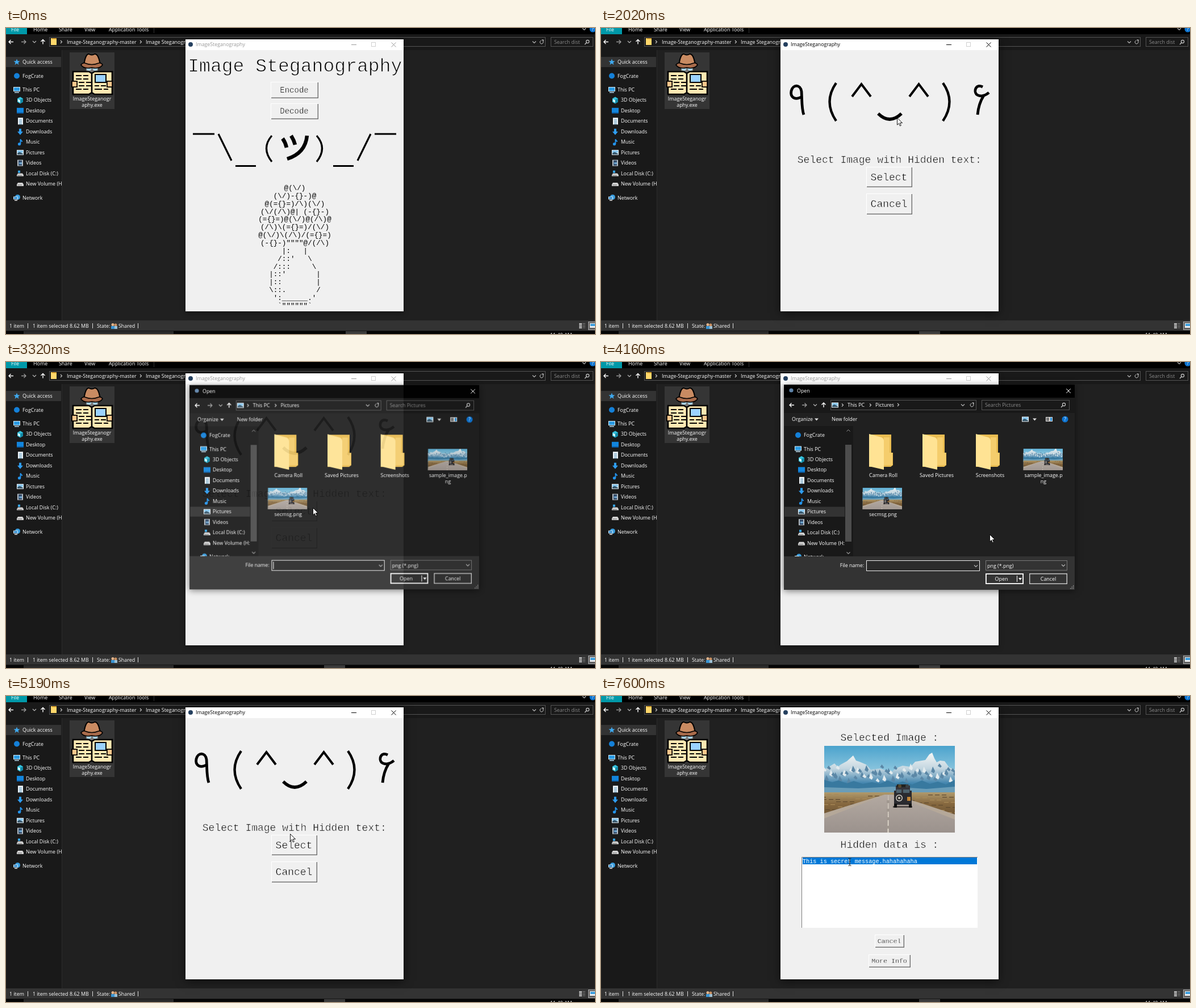
Animation of 1037x540 px, one loop 8 s. Source, as an HTML page with a canvas:

```html
<!DOCTYPE html>
<html lang="en">
<head>
<meta charset="utf-8">
<title>Image Steganography</title>
<style>
html, body { margin: 0; width: 100%; height: 100%; overflow: hidden; background: #000; }
canvas { display: block; width: 1037px; height: 540px; }
</style>
</head>
<body>
<canvas id="stage" width="1037" height="540"></canvas>
<script>
const W = 1037, H = 540, LOOP = 8000, PAPER = '#f0f0f0';
const stage = document.getElementById('stage').getContext('2d');
const layer = Object.assign(document.createElement('canvas'), { width: W, height: H });
let c = stage;

const SANS = '"Open Sans", "Noto Sans", sans-serif';
const MONO = '"Liberation Mono", "DejaVu Sans Mono", monospace';

// ---------- helpers ----------
function rect(x, y, w, h, color) { c.fillStyle = color; c.fillRect(x, y, w, h); }
function frame(x, y, w, h, color, lw = 1) {
  c.strokeStyle = color; c.lineWidth = lw;
  c.strokeRect(x + lw / 2, y + lw / 2, w - lw, h - lw);
}
function fill(d, color) { c.fillStyle = color; c.fill(new Path2D(d)); }
function line(d, color, w = 1) { c.strokeStyle = color; c.lineWidth = w; c.stroke(new Path2D(d)); }
function dot(x, y, r, color) { c.fillStyle = color; c.beginPath(); c.arc(x, y, r, 0, 7); c.fill(); }
function text(s, x, y, color = '#fff', align = 'left', size = 8.9) {
  c.font = `${size}px ${SANS}`; c.fillStyle = color; c.textAlign = align; c.fillText(s, x, y);
}
function mono(s, x, y, size, align = 'center', color = '#000') {
  c.font = `${size}px ${MONO}`; c.fillStyle = color; c.textAlign = align; c.fillText(s, x, y);
}
// large lettering with its stems trimmed to a light weight
function light(s, x, y, size) {
  mono(s, x, y, size);
  c.lineJoin = 'round';
  c.strokeStyle = PAPER; c.lineWidth = size * 0.03; c.strokeText(s, x, y);
  c.lineJoin = 'miter';
}
function at(x, y, draw) { c.save(); c.translate(x, y); draw(); c.restore(); }
function clip(x, y, w, h, draw) {
  c.save(); c.beginPath(); c.rect(x, y, w, h); c.clip(); draw(); c.restore();
}
const chevron = (x, y, col = '#bbb') => line(`M${x - 3} ${y - 1.5}l3 3 3-3`, col, 1.1);
const crumb = (x, y) => line(`M${x - 1} ${y - 2.5}l2.5 2.5-2.5 2.5`, '#ccc', 1.1);
const cross = (x, y, r, col) => line(`M${x - r} ${y - r}l${2 * r} ${2 * r}m0 ${-2 * r}l${-2 * r} ${2 * r}`, col, 1);

// ---------- icons, centred on 0,0 ----------
const icons = {
  star: () => fill('M0-5.5L1.5-1.8 5.5-1.6 2.4.9 3.5 5 0 2.6-3.5 5-2.4.9-5.5-1.6-1.5-1.8Z', '#3fa9ee'),
  disc: () => dot(0, 0, 5, '#1480d8'),
  pc: () => { rect(-6, -5, 12, 8, '#d5eefc'); rect(-5, -4, 10, 6, '#2a9be4'); rect(-4, 4, 8, 1.5, '#b9dcf0'); },
  cube: () => { fill('M0-6L5-3V3L0 6-5 3V-3Z', '#35c1dc'); fill('M0-1L5-3V3L0 6Z', '#118ba8'); fill('M-4-2L0 0V4L-4 2Z', '#d9f8ff'); },
  desk: () => { rect(-6, -5, 12, 9, '#1285dc'); rect(-6, 3, 12, 2, '#0c5fa8'); },
  doc: () => { rect(-4, -6, 9, 12, '#edf3f7'); for (let i = -3; i < 5; i += 2.5) rect(-2, i, 5, 1, '#4f8fb5'); },
  down: () => fill('M-2-5H2V0H5L0 6-5 0H-2Z', '#2f9df0'),
  note: () => { dot(-1.5, 3.5, 2.6, '#2495ee'); line('M.5 3.5V-5Q1-2 4-1', '#2495ee', 1.8); },
  pic: () => { rect(-6, -4.5, 12, 9, '#f1f6f9'); rect(-5, -3.5, 10, 4, '#86c6ee'); fill('M-5 3.5V1L-1-1 5 2V3.5Z', '#35566b'); },
  film: () => { rect(-5, -5.5, 10, 11, '#b5bdc4'); rect(-3, -4.5, 6, 9, '#324a68'); rect(-2, -1, 5, 3, '#6fa6cf'); },
  disk: () => { rect(-4, -5, 4, 4, '#36a6e8'); fill('M-4 0H4L6 3V5H-6V3Z', '#d4d4d4'); rect(-5, 3, 8, 1, '#777'); },
  drive: () => { fill('M-4-2H4L6 1V4H-6V1Z', '#d4d4d4'); rect(-5, 1.5, 8, 1, '#777'); },
  net: () => { dot(1.5, -1, 4.5, '#3b9fe0'); rect(-6, -2, 8, 5, '#d5eefc'); rect(-5, -1, 6, 3, '#2a86cc'); rect(-4, 4, 5, 1.5, '#ddd'); }
};
function icon(kind, x, y) { at(x, y, icons[kind]); }

const rows = [
  ['Quick access', 'star', 60], ['FogCrate', 'disc', 84.5], ['This PC', 'pc', 109],
  ['3D Objects', 'cube'], ['Desktop', 'desk'], ['Documents', 'doc'], ['Downloads', 'down'], ['Music', 'note'],
  ['Pictures', 'pic'], ['Videos', 'film'], ['Local Disk (C:)', 'disk'], ['New Volume (H:)', 'drive'],
  ['Network', 'net', 299.5]
];
function tree() {
  rows.forEach(([label, kind, top], i) => {
    const y = top || 109 + (i - 2) * 18.45;
    icon(kind, top ? 19 : 25, y);
    text(label, top ? 29 : 35, y + 3);
  });
}

function navArrows(x, y) {
  line(`M${x + 9} ${y}h-8m3.5-3.5L${x + 1} ${y}l3.5 3.5`, '#fff', 1.3);
  line(`M${x + 23} ${y}h8m-3.5-3.5l3.5 3.5-3.5 3.5`, '#999', 1.3);
  chevron(x + 46, y);
  line(`M${x + 61} ${y + 4}v-8m-3.5 3.5l3.5-3.5 3.5 3.5`, '#fff', 1.4);
}
function refresh(x, y) {
  c.strokeStyle = '#ccc'; c.lineWidth = 1;
  c.beginPath(); c.arc(x, y, 2.9, -0.6, 4.6); c.stroke();
  fill(`M${x} ${y - 4.5}h3.5v3.5z`, '#ccc');
}
function magnifier(x, y) {
  c.strokeStyle = '#ccc'; c.lineWidth = 1.1;
  c.beginPath(); c.arc(x + 1, y - 1, 2.6, 0, 7); c.stroke();
  line(`M${x - 1} ${y + 1}l-3 3`, '#ccc', 1.3);
}
function help(x, y) { dot(x, y, 5.5, '#0d74d1'); text('?', x, y + 3, '#fff', 'center', 8.5); }

// ---------- file explorer ----------
function spy() {
  fill('M137 66Q140 45 146 46 151 49 156 46 163 45 166 66Z', '#c98b62');
  line('M137 66Q140 45 146 46 151 49 156 46 163 45 166 66', '#000', 2);
  rect(141, 66, 21, 12, '#777');
  dot(146, 71, 4.5, '#a9d3e5'); dot(157, 71, 4.5, '#a9d3e5');
  const brim = 'M132 65Q135 61 139 62 151 67 163 62 168 61 170 65 165 73 151 70 137 73 132 65Z';
  fill(brim, '#a86b4b'); line(brim, '#000', 1.6);
  const paper = 'M118 77H146L151 80 156 77H187V117H156L151 114 146 117H118Z';
  fill(paper, '#ffe9b3'); line(paper + 'M151 80V114', '#000', 2.6);
  for (let i = 0; i < 5; i++) line(`M${i > 1 && i < 4 ? 128 : 123} ${84 + i * 6}h10m3 0h9`, '#000', 2);
  rect(157, 82, 19, 14, '#9bd2ff'); frame(156, 81, 21, 16, '#000', 2);
  line('M156 102h8m3 0h9M156 108h13m3 0h8', '#000', 2);
  for (const x of [116, 178]) { rect(x, 94, 9, 10, '#ffc78c'); frame(x - 1, 93, 11, 12, '#000', 1.8); }
}

function explorer(t) {
  rect(0, 0, W, H, '#202020');
  rect(0, 0, W, 11, '#000');
  rect(0, 0, 37, 11, '#0099a9');
  rect(260, 0, 1, 9, '#333');
  text('File', 9, 6); text('Home', 48, 6); text('Share', 93, 6); text('View', 138, 6);
  text('Application Tools', 181, 6);
  chevron(1018, 2); help(1033, 2);

  rect(0, 11, W, 28, '#191919');
  navArrows(4, 24.5);
  frame(76, 16, 874, 17, '#535353');
  rect(79, 18, 10, 12, '#ffd86b'); rect(81, 18, 8, 2, '#e8ae35');
  crumb(97, 24.5); text('Image-Steganography-master', 107, 27.5);
  crumb(237, 24.5); text('Image Steganography', 246, 27.5);
  chevron(930, 25); refresh(943, 25);
  frame(959, 16, 75, 17, '#535353');
  text('Search dist', 965, 27.5, '#8a8a8a'); magnifier(1023, 25);

  rect(0, 39, 99, 477, '#191919');
  rect(98, 39, 1, 477, '#2b2b2b');
  rect(0, 51, 97, 18, '#333');
  clip(0, 39, 98, 476, tree);

  rect(112, 43, 79, 100, '#353535');
  spy();
  text('ImageSteganogr', 151.5, 127.5, '#fff', 'center');
  text('aphy.exe', 151.5, 139, '#fff', 'center');

  rect(0, 516, W, 18.5, '#333');
  text('1 item', 6, 529); text('1 item selected', 47, 529); text('8.62 MB', 112, 529);
  text('State:', 160, 529); text('Shared', 198, 529);
  for (const x of [38, 152, 232]) rect(x, 521, 1, 9, '#ddd');
  dot(188, 523.5, 2.5, '#e2b48b'); dot(193, 524, 2.5, '#c98f60');
  rect(185, 526, 6, 5, '#3a95d4'); rect(191, 526, 5, 5, '#9cbfd4');
  for (let i = 0; i < 4; i++) { rect(1009, 521 + i * 2.5, 5, 1.5, '#ddd'); rect(1015, 521 + i * 2.5, 5, 1, '#777'); }
  rect(1025, 518, 12, 15, '#606060'); frame(1025, 518, 14, 15, '#aaa');
  rect(1028, 521, 9, 8, '#eee'); rect(1029, 522, 8, 4, '#3c9fdf');

  rect(0, 534.5, W, 6, '#050505');
  rect(31, 535, 264, 5, '#2a2a2a');
  rect(t < 1310 ? 598 : 560, 535, 37, 5, '#3b3b3b');
  text('11:40 AM', 958, 545);
}

// ---------- landscape, 230 x 153 ----------
function fade(y0, y1, ...colors) {
  const g = c.createLinearGradient(0, y0, 0, y1);
  colors.forEach((col, i) => g.addColorStop(i / (colors.length - 1), col));
  return g;
}
function photo() {
  rect(0, 0, 230, 153, fade(0, 60, '#4ba3cd', '#a3d2e4'));
  fill('M0 42L10 36 18 31 24 37 29 33 40 27 51 17 56 26 62 28 74 33 82 42 98 40 118 46 130 38 138 35 152 37 160 28 166 27 178 25 185 15 190 12 194 22 198 29 204 26 212 27 220 38 230 42V90H0Z',
    fade(14, 66, '#f2f4f4', '#c3d6e0', '#4385ae'));
  for (let i = 0; i < 60; i++) {
    const x = i * 3.9, y = 38 + 7 * Math.sin(i * 1.9) + i * 7 % 13, h = 5 + i * 3 % 6;
    fill(`M${x} ${y}l4 ${h} -2 ${h / 2} -5-3z`, i % 3 ? '#5b87a6' : '#e3ebee');
  }
  fill('M0 60L14 64 25 61 40 66 52 62 68 67 84 64 98 67 112 61 126 67 138 63 155 68 172 61 186 67 200 63 214 68 230 60V90H0Z', '#38799f');
  fill('M0 73L60 75 120 72 180 76 230 72V90H0Z', '#6a9db8');
  rect(0, 82, 230, 71, fade(82, 122, '#b09a6c', '#86683f', '#6e5535'));
  for (let i = 0; i < 90; i++) rect(i * 53 % 237 - 7, 85 + i * 17 % 36, 8, 1.2, i % 2 ? '#5f4a30' : '#a98a58');
  fill('M106 86L60 100 0 119V153H230V121L170 101 121 86Z', '#b5a899');
  fill('M108 86L0 128V153H230V130L119 86Z', fade(86, 153, '#b3a9a1', '#9b928d'));
  fill('M112.6 87L111.5 153H113.5L113.2 87Z', '#e3dccf');
  for (let y = 96; y < 150; y += 15) rect(110, y, 5, 5, '#a0978f');
  rect(121, 106, 34, 3, '#4f4846');
  rect(123, 79, 31, 25, '#2a2a2f');
  rect(126, 70, 25, 12, '#35343a');
  rect(128, 68, 20, 5, '#20211f'); dot(133, 71, 3, '#57482f'); dot(146, 71, 3, '#3b4145');
  rect(127, 77, 9, 6, '#4d626d'); rect(139, 77, 11, 6, '#4d626d');
  dot(132, 92, 6, '#dad6cf'); dot(132, 92, 4.6, '#30302f'); dot(132, 92, 2, '#c9c3ba');
  rect(146, 90, 6, 7, '#c08437');
  rect(123, 102, 5, 7, '#111'); rect(149, 102, 5, 7, '#111');
}
function thumb(x, y) {
  clip(x, y, 69.5, 38, () => at(x, y - 4, () => { c.scale(0.303, 0.303); photo(); }));
}

// ---------- application window ----------
function button(label, x, y, w, h, base, size, down) {
  rect(x, y, w, h, down ? '#696969' : '#fff');
  rect(x + 1, y + 1, w - 1, h - 1, down ? '#fff' : '#696969');
  rect(x + 1, y + 1, w - 2, h - 2, down ? PAPER : '#a0a0a0');
  rect(x + 1, y + 1, w - 2.6, h - 2.6, PAPER);
  light(label, x + w / 2 + (down ? 0.5 : -0.5), base + (down ? 1 : 0), size);
}

const pot = String.raw`@(\/)
(\/)-{}-)@
@(={}=)/\)(\/)
(\/(/\)@| (-{}-)
(={}=)@(\/)@(/\)@
(/\)\(={}=)/(\/)
@(\/)\(/\)/(={}=)
(-{}-)""""@/(/\)
|:   |
/::'   \
/:::     \
|::'       |
|::        |
\::.       /
':______.'
` + '`""""""`';

function homePage() {
  light('Image Steganography', 508.8, 77, 33.1);
  button('Encode', 466, 95, 84, 29, 114, 14);
  button('Decode', 466, 133, 84, 28, 151, 14);
  line('M329 187h38M649 187h38M404 243.5h36M576 243.5h36', '#000', 3);
  line('M374 187L397 234M642 187L619 234M468 190Q449 212 468 236M547 190Q566 212 547 236', '#000', 3.2);
  line('M487 195Q492 202 494 211M502 190Q507 198 509 206', '#000', 6.5);
  line('M530 190Q527 221 495 231', '#000', 6.5);
  pot.split('\n').forEach((s, i) => mono(s, 508.5, 286 + i * 13.86, 12.6));
}

function selectPage(t) {
  line('M354 121C340 129 333 121 335 111 338 99 351 99 353 112 354 128 353 142 357 153', '#000', 4.8);
  line('M672 104C660 98 656 111 661 117 667 122 676 120 683 114M674 119C667 130 664 141 663 153', '#000', 4.8);
  line('M414 97Q391 130 414 164M602 97Q625 130 602 164', '#000', 4.3);
  line('M442 121L458.5 99 475 121M543 121L559.5 99 576 121', '#000', 4);
  line('M488 151Q508 171 529 151', '#000', 5.5);
  light('Select Image with Hidden text:', 507.8, 238, 18);
  button('Select', 467, 245, 81, 36, 269, 18, t >= 2670 && t < 2820);
  button('Cancel', 467, 292, 81, 37, 316, 18);
}

function resultPage(t) {
  light('Selected Image :', 508, 79, 18);
  at(393, 88, () => clip(0, 0, 230, 153, photo));
  light('Hidden data is :', 508, 268, 18);
  rect(353, 284, 310, 125, '#fff');
  line('M353.5 409V284.5H663', '#808080');
  const message = 'This is secret message.hahahahaha';
  const put = color => mono(message, 355, 294.5, 10.2, 'left', color);
  put('#000');
  const mark = t >= 7520 ? [355, 307] : t >= 7290 ? [404, 37] : null;
  if (mark) clip(mark[0], 285, mark[1], 12, () => { rect(355, 285, 307, 13, '#0078d7'); put('#fff'); });
  button('Cancel', 482, 421, 52, 23, 436, 11.6);
  button('More Info', 471, 456, 74, 23, 471, 11.6);
}

function appWindow(t) {
  const active = t >= 1310 && t < 2820 || t >= 4950;
  c.save();
  c.shadowColor = active ? 'rgba(0,0,0,.6)' : 'rgba(0,0,0,.4)';
  c.shadowBlur = active ? 16 : 9; c.shadowOffsetY = 3;
  rect(316, 20, 384, 480, PAPER);
  c.restore();
  rect(316, 20, 384, 19, '#fff');
  const ink = active ? '#000' : '#999';
  dot(325, 29, 4, '#25405f');
  text('ImageSteganography', 334, 32, ink, 'left', 8.8);
  rect(608, 29, 9, 1, ink);
  frame(643, 25, 8, 8, '#d0d0d0');
  cross(682.5, 29.5, 4, ink);
  if (t < 1390) homePage(); else if (t < 5360) selectPage(t); else resultPage(t);
}

// ---------- file dialog ----------
function dialogShell(closing) {
  c.save();
  c.shadowColor = 'rgba(0,0,0,.5)'; c.shadowBlur = 11; c.shadowOffsetY = 2;
  rect(322, 40, 512, 362, '#202020');
  c.restore();
  rect(322, 40, 512, 23, closing ? '#1c1c1c' : '#000');
  if (!closing) { dot(335, 50, 3.6, '#5d82a8'); cross(823, 51, 3.8, '#fff'); }
  text('Open', closing ? 329 : 345, 54);
}
function sidePane(x, y) { rect(x - 6, y - 4, 12, 8, '#ddd'); rect(x - 5, y - 3, 5, 6, '#777'); rect(x + 2, y - 3, 3, 6, '#2c90d8'); }

function dialogLoading() {
  dialogShell(false);
  rect(322, 343, 512, 59, '#2e2e2e');
  rect(322, 144, 119, 18, '#3d3d3d'); rect(442, 90, 1, 253, '#2b2b2b');
  icon('star', 347, 129); text('Quick access', 357, 132);
  icon('pc', 347, 153); text('This PC', 357, 156);
  text('Working on it...', 601, 134);
  for (const y of [74, 101]) { sidePane(774, y); help(802, y); }
  rect(422, 353, 41, 12, '#1a1a1a');
  rect(467, 350, 200, 19, '#fff');
  frame(677, 350, 144, 18, '#777'); text('png (*.png)', 680, 362); chevron(814, 359);
  rect(677, 372, 67, 21, '#151515'); rect(754, 372, 67, 21, '#151515');
}

function folder(x, label) {
  fill(`M${x} 128h39v32h3v22l-4 3H${x}z`, '#e9bc51');
  fill(`M${x} 127l22 6q4 2 4 6v51L${x} 184z`, '#ffe394');
  fill(`M${x + 26} 133h10v27h5v22h-15z`, '#f5cd6c');
  text(label, x + 25, 202.5, '#fff', 'center');
}

function dialogReady(t) {
  const closing = t >= 4950, picked = t >= 4780;
  dialogShell(closing);
  rect(322, 63, 512, 27, '#191919');
  navArrows(331, 76);
  frame(404, 67, 257, 18, '#535353');
  icon('pic', 412, 76); crumb(425, 76); text('This PC', 434, 78.5);
  crumb(474, 76); text('Pictures', 483, 78.5);
  if (t >= 3520) crumb(523, 75.5);
  chevron(637, 76); refresh(653, 76);
  frame(670, 67, 155, 18, '#535353');
  text('Search Pictures', 676, 79, '#8a8a8a'); magnifier(814, 76);

  text('Organize', 336, 104); fill('M376 99.5h7l-3.5 4z', '#ddd');
  text('New folder', 406, 104);
  icon('pic', 747, 101); fill('M760 99.5h7l-3.5 4z', '#ddd');
  sidePane(789, 101); help(817, 101);

  rect(322, 113, 107, 230, '#191919');
  rect(323, 255.5, 106, 17.5, '#333');
  clip(322, 113, 107, 230, () => at(328, 44.5, tree));
  rect(429, 113, 15, 230, '#191919');
  rect(430, 146, 11, 171, '#4d4d4d');
  line('M432.500 122.500l3-3 3 3', '#999'); chevron(435.5, 337, '#999');

  folder(472, 'Camera Roll'); folder(566, 'Saved Pictures'); folder(660, 'Screenshots');
  thumb(743.5, 153);
  text('sample_image.p', 779, 202.5, '#fff', 'center');
  text('ng', 779, 214, '#fff', 'center');
  if (t >= 4470) {
    rect(456, 220, 80, 56, picked ? '#777' : '#4d4d4d');
    if (picked) frame(456, 220, 80, 56, '#999');
  }
  thumb(460.5, 222);
  text('secmsg.png', 496.5, 272, '#fff', 'center');

  rect(322, 343, 512, 59, '#333');
  text('File name:', 463, 362, '#fff', 'right');
  rect(467, 350, 200, 19, '#2b2b2b'); frame(467, 350, 200, 19, '#eee'); chevron(660, 360);
  if (picked) text('secmsg.png', 470, 363);
  else if (t < 3770 || t >= 4240) rect(470, 353, 1, 13, '#fff');
  frame(677, 350, 144, 18, '#777'); text('png (*.png)', 680, 362.5); chevron(814, 359);
  frame(677, 373, 67, 19, '#fff', 1.8); text('Open', 705, 385.5, '#fff', 'center');
  rect(732, 377, 1, 11, '#fff'); fill('M735 381h6l-3 4z', '#fff');
  frame(754, 373, 67, 19, '#ccc', 1.4); text('Cancel', 787.5, 385.5, '#fff', 'center');
  for (let i = 0; i < 3; i++) for (let j = 0; j <= i; j++) rect(831 - j * 2.5, 394 + i * 2.5, 1.3, 1.3, '#aaa');
}

// start, opacity, scale
const fades = [
  [3140, 0.33, 0.967], [3220, 0.72, 0.987], [3300, 0.93, 0.996], [3380, 1, 1],
  [4950, 0.92, 0.996], [5030, 0.68, 0.988], [5110, 0.3, 0.972], [5190, 0, 1]
];
function dialog(t) {
  const step = fades.filter(f => t >= f[0]).pop();
  if (!step || !step[1]) return;
  const [, alpha, scale] = step;
  c = layer.getContext('2d');
  c.clearRect(0, 0, W, H);
  if (t < 3300) dialogLoading(); else dialogReady(t);
  c = stage;
  c.save();
  c.globalAlpha = alpha;
  c.translate(578, 221); c.scale(scale, scale); c.translate(-578, -221);
  c.drawImage(layer, 0, 0);
  c.restore();
}

// ---------- pointer ----------
// first step, last step, steps, x, y
const moves = [
  [140, 140, 1, 740, 352], [210, 210, 1, 636, 270], [450, 680, 4, 535, 169], [850, 1080, 4, 516, 150],
  [2020, 2020, 1, 521, 158], [2105, 2270, 3, 540, 246], [2420, 2500, 2, 540, 257],
  [3770, 3990, 4, 684, 304], [4240, 4550, 5, 500, 243], [5900, 6200, 5, 531, 379], [6510, 6990, 7, 438, 293]
];
const clicks = [[1310, 1470], [2670, 2820], [4780, 5110], [7210, 7600]];

function pointer(t) {
  let x, y;
  for (const [t0, t1, n, tx, ty] of moves) {
    if (t < t0) break;
    const k = n > 1 ? Math.min(n, 1 + Math.floor((t - t0) / ((t1 - t0) / (n - 1)) + 1e-6)) : 1;
    const p = k / n, e = p * (2 - p);
    x = k === n ? tx : x + (tx - x) * e;
    y = k === n ? ty : y + (ty - y) * e;
  }
  if (x === undefined) return;
  if (clicks.some(([a, b]) => t >= a && t < b)) dot(x, y + 0.5, 9, 'rgba(250,212,40,.72)');
  at(x, y, () => {
    if (t >= 5360 && y > 284) {
      line('M-2.5-6.500h2m1 0h2M0-6V6M-2.500 6.500h2m1 0h2', '#222', 1.2);
    } else {
      const arrow = 'M.5.5V13L3.400 10.300 5.300 14.800 7.300 14 5.400 9.500H9.500Z';
      fill(arrow, '#fff'); line(arrow, '#000', 0.9);
    }
  });
}

function draw(now) {
  const t = now % LOOP;
  explorer(t);
  appWindow(t);
  dialog(t);
  pointer(t);
  requestAnimationFrame(() => draw(performance.now()));
}
draw(0);
</script>
</body>
</html>
```
